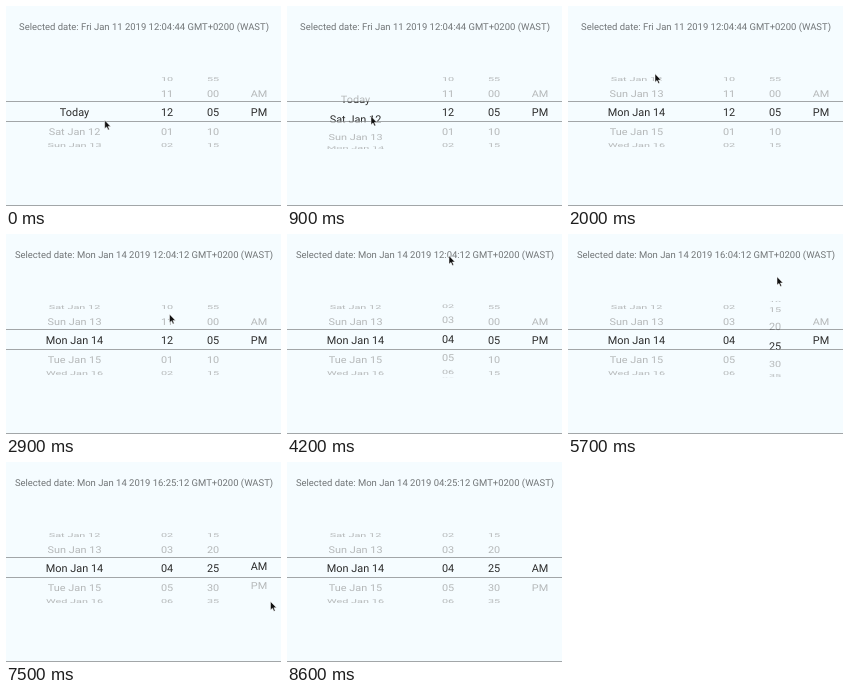
An HTML page that plays this animation: 275x200 px, repeating every 9 s.

```html
<!DOCTYPE html>
<html lang="en">
<head>
<meta charset="utf-8">
<title>Date wheel picker</title>
<style>
  html, body { margin: 0; width: 100%; height: 100%; overflow: hidden; background: #f5fcff; }
  svg { display: block; width: 100vw; height: 100vh; }
  text { font-family: Roboto, "Open Sans", sans-serif; text-anchor: middle; text-rendering: geometricPrecision; }
  #label { font-size: 9.48px; fill: #717577; }
  #outer, #inner { font-size: 10.9px; }
  #outer { fill: #b5b8b9; }
  #inner { fill: #2c2c2c; }
</style>
</head>
<body>
<svg viewBox="0 0 275 200">
  <clipPath id="band"><rect y="95.5" width="275" height="20"/></clipPath>
  <clipPath id="rest"><path d="M0 0H275V95.5H0ZM0 115.5H275V200H0Z"/></clipPath>
  <rect width="275" height="200" fill="#f5fcff"/>
  <path d="M0 95H275V96H0ZM0 115H275V116H0ZM0 199H275V200H0Z" fill="#a2a6a8"/>
  <text id="label" x="138" y="24"></text>
  <g clip-path="url(#rest)"><g id="outer"></g></g>
  <g clip-path="url(#band)"><g id="inner"></g></g>
  <path id="cursor" d="M0 0V8.4L2 6.7L3.4 9.8L4.7 9.2L3.4 6.2H6Z" fill="#111" stroke="#fff" stroke-width=".5"/>
</svg>
<script>
const LOOP = 9000, STEP = 100;
const CENTER = 105.5, PITCH = 20, SLOTS = 7, BASELINE = 4.9;
const RADIUS = PITCH * (SLOTS - 1) / Math.PI;
const SLOP = 8;           // finger travel before a wheel follows
const REPORT_DELAY = 200; // from wheel at rest to new label

const $ = id => document.getElementById(id);
const pad = n => String(n).padStart(2, "0");
const wrap = (n, m) => ((n % m) + m) % m;
const mix = (a, b, p) => a + (b - a) * p;
const part = (t, a, b) => b > a ? Math.min(1, Math.max(0, (t - a) / (b - a))) : +(t >= b);
const easeOut = p => 1 - (1 - p) ** 2;

const DAYS = ["Sun", "Mon", "Tue", "Wed", "Thu", "Fri", "Sat"];
const dayText = i => i < 0 ? "" : i === 0 ? "Today" : `${DAYS[(5 + i) % 7]} Jan ${11 + i}`;

const days = { x: 68.5, start: 0, text: dayText };
const hours = { x: 161, start: 12, text: i => pad(wrap(i - 1, 12) + 1) };
const minutes = { x: 207, start: 1, text: i => pad(wrap(i, 12) * 5) };
const halves = { x: 253, start: 1, text: i => ["AM", "PM"][i] || "" };
const wheels = [days, hours, minutes, halves];

// The pointer goes to `from`, presses, drags to `to`; the wheel is then freed and comes to rest.
const moves = [
  { go: 0, at: 600, from: [82.5, 131.5], to: [87, 67.8], down: 700, up: 1300,
    wheel: days, free: 1400, rest: 2100, stamp: "Mon Jan 14 2019 12:04:12" },
  { go: 2600, at: 2900, from: [163.5, 80.2] },
  { go: 3000, at: 3400, from: [163, 116.5], to: [162, 21.7], down: 3400, up: 4000,
    wheel: hours, free: 4000, rest: 4400, stamp: "Mon Jan 14 2019 16:04:12" },
  { go: 4500, at: 5000, from: [209, 123.5], to: [209, 42.7], down: 5000, up: 5600,
    wheel: minutes, free: 5600, rest: 6300, stamp: "Mon Jan 14 2019 16:25:12" },
  { go: 6700, at: 7200, from: [260, 113.5], to: [264.5, 139.5], down: 7200, up: 7500,
    wheel: halves, free: 7600, rest: 8000, stamp: "Mon Jan 14 2019 04:25:12" },
  { go: 8400, at: 8600, from: [272.5, 117.5] }
];
const GONE = moves[moves.length - 1].at;

function pointerAt(t) {
  let pos = [98.7, 114.2];
  const lead = (goal, a, b) => { pos = pos.map((v, i) => mix(v, goal[i], part(t, a, b))); };
  for (const m of moves) {
    lead(m.from, m.go, m.at);
    if (m.to) lead(m.to, m.down, m.up);
  }
  return pos;
}

function scrollAt(wheel, t) {
  const m = moves.find(move => move.wheel === wheel);
  const travel = (m.from[1] - m.to[1]) * part(t, m.down, m.up);
  const pull = Math.sign(travel) * Math.max(0, Math.abs(travel) - SLOP);
  const pos = wheel.start + pull / PITCH;
  return mix(pos, Math.round(pos), easeOut(part(t, m.free, m.rest)));
}

function stampAt(t) {
  const done = moves.filter(m => m.stamp && t >= m.rest + REPORT_DELAY).pop();
  return done ? done.stamp : "Fri Jan 11 2019 12:04:44";
}

function addText(parent) {
  return $(parent).appendChild(document.createElementNS("http://www.w3.org/2000/svg", "text"));
}

for (const wheel of wheels) {
  wheel.slots = Array.from({ length: SLOTS }, () => [addText("outer"), addText("inner")]);
}

function drawWheel(wheel, t) {
  const pos = scrollAt(wheel, t);
  const first = Math.round(pos) - (SLOTS - 1) / 2;
  wheel.slots.forEach((pair, n) => {
    const angle = (first + n - pos) * PITCH / RADIUS;
    const squash = Math.cos(angle);
    const y = CENTER + RADIUS * Math.sin(angle);
    for (const el of pair) {
      el.textContent = squash > 0.02 ? wheel.text(first + n) : "";
      el.setAttribute("y", BASELINE);
      el.setAttribute("transform", `translate(${wheel.x} ${y}) scale(1 ${Math.max(squash, 0.02)})`);
    }
  });
}

let shown = -1;
function draw(t) {
  if (t === shown) return;
  shown = t;
  wheels.forEach(w => drawWheel(w, t));
  $("label").textContent = `Selected date: ${stampAt(t)} GMT+0200 (WAST)`;
  $("cursor").setAttribute("transform", `translate(${pointerAt(t)})`);
  $("cursor").setAttribute("visibility", t < GONE ? "visible" : "hidden");
}

function tick() {
  draw(Math.floor(performance.now() % LOOP / STEP) * STEP);
  requestAnimationFrame(tick);
}
tick();
</script>
</body>
</html>
```
